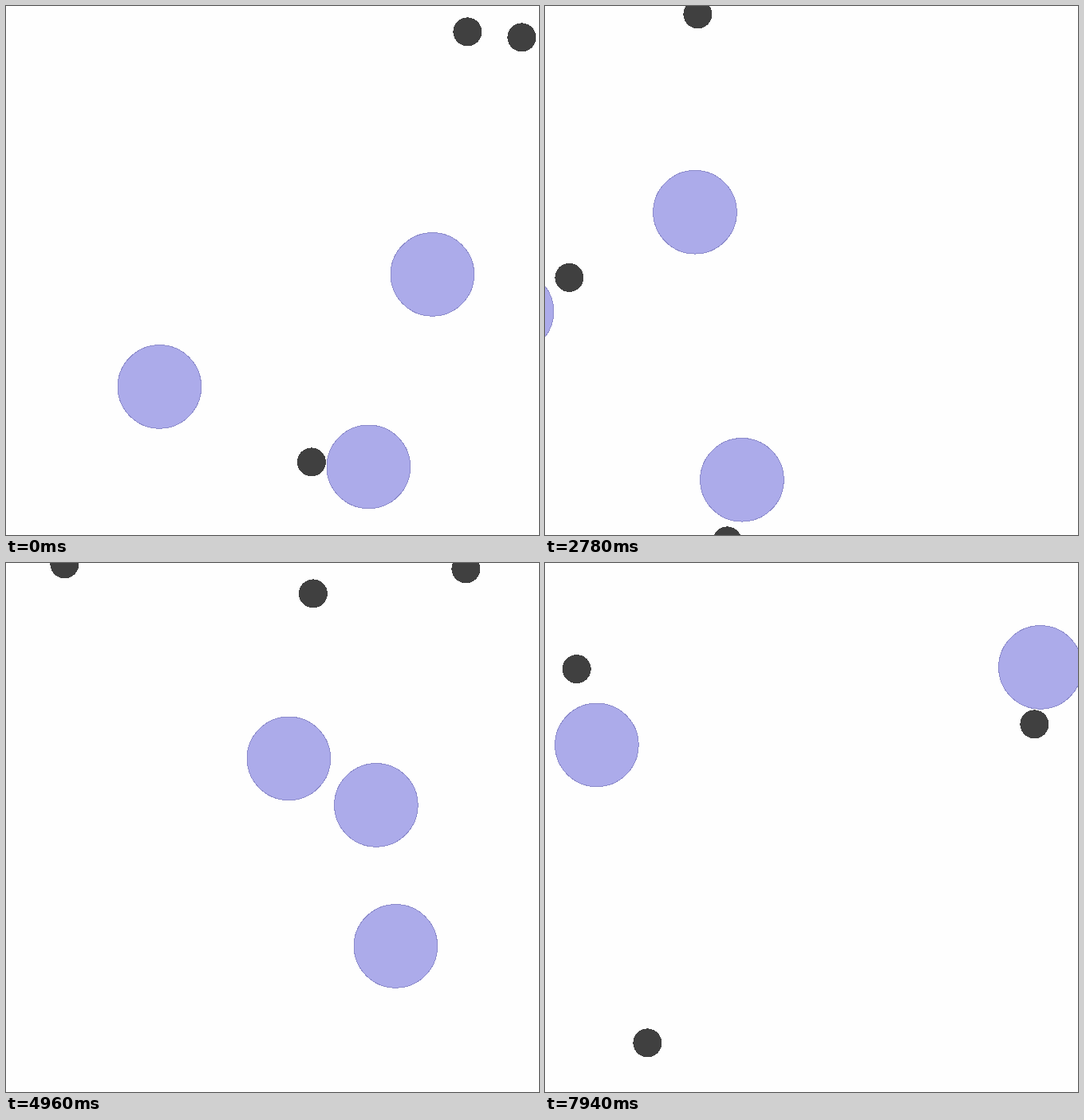
An HTML page that plays this animation: 668 by 664 pixels, repeating every 8000 ms.

```html
<!DOCTYPE html>
<html lang="en">
<head>
<meta charset="utf-8">
<title>Agents and landmarks</title>
<style>
  html, body { margin: 0; width: 100%; height: 100%; overflow: hidden; background: #fefefe; }
  svg { display: block; width: 100%; height: 100%; shape-rendering: crispEdges; }
  .agent { fill: #acabea; stroke: #8c8bcb; stroke-width: 1; }
  .landmark { fill: #404040; }
</style>
</head>
<body>
<svg viewBox="0 0 668 664"><g id="world" transform="translate(.4 .4)"></g></svg>
<script>
const LOOP = 8000, FRAME = 69.65, LEAD = 25, EPISODE = 34;
const at = (x, y) => ({ x, y });

// A smooth path through evenly timed points, at rest at both ends.
function glide(delay, steps, ...points) {
  const last = points.length - 1;
  const slope = (i, axis) =>
    i > 0 && i < last ? (points[i + 1][axis] - points[i - 1][axis]) / 2 : 0;

  return step => {
    const progress = Math.min(Math.max((step - delay) / steps, 0), 1) * last;
    const i = Math.min(Math.floor(progress), last - 1);
    const u = progress - i, v = 1 - u;
    const blend = axis =>
      v * v * (1 + 2 * u) * points[i][axis] + u * u * (3 - 2 * u) * points[i + 1][axis] +
      u * v * (v * slope(i, axis) - u * slope(i + 1, axis));
    return at(blend("x"), blend("y"));
  };
}

const episodes = [
  {
    landmarks: [at(578, 32), at(646, 39), at(382.5, 572)],
    agents: [
      glide(0, 11, at(534, 336.5), at(565, 42)),
      glide(0, 8, at(192, 477.5), at(-70, 440)),
      glide(0, 14, at(454, 578), at(600, 730))
    ]
  },
  {
    landmarks: [at(191, 10), at(30, 340.5), at(228, 671)],
    agents: [
      glide(0, 36, at(345, 290), at(117, 230), at(190, 117.5), at(279, -42), at(215, 70)),
      glide(0, 10, at(300, 480), at(217.5, 656.5)),
      glide(0, 8, at(110, 400), at(-70, 380))
    ]
  },
  {
    landmarks: [at(73, 1), at(384.5, 38), at(576, 7)],
    agents: [
      glide(3, 8, at(354, 245), at(380, 34.5)),
      glide(3, 11, at(463.5, 303.5), at(215, 95), at(112, -60)),
      glide(3, 10, at(488, 480.5), at(160, 605), at(112, 720))
    ]
  },
  {
    landmarks: [at(39.3, 132.7), at(613, 202), at(128, 602)],
    agents: [
      glide(3, 8, at(250.5, 296.5), at(215, 720)),
      glide(3, 9, at(449, 348.5), at(475, 100), at(620.5, 130.5)),
      glide(3, 9, at(70, 422.5), at(64.5, 228))
    ]
  }
];

const world = document.getElementById("world");

function makeCircles(name, radius) {
  return [0, 1, 2].map(() => {
    const circle = document.createElementNS("http://www.w3.org/2000/svg", "circle");
    circle.setAttribute("class", name);
    circle.setAttribute("r", radius);
    return world.appendChild(circle);
  });
}

const agentDots = makeCircles("agent", 52.3);
const landmarkDots = makeCircles("landmark", 18);

function place(circle, { x, y }) {
  circle.setAttribute("cx", x);
  circle.setAttribute("cy", y);
}

function draw(time) {
  const frame = Math.floor((time % LOOP + LEAD) / FRAME);
  const { landmarks, agents } = episodes[Math.floor(frame / EPISODE)];
  landmarks.forEach((point, i) => place(landmarkDots[i], point));
  agents.forEach((path, i) => place(agentDots[i], path(frame % EPISODE)));
}

const start = performance.now();
function tick() {
  draw(performance.now() - start);
  requestAnimationFrame(tick);
}
tick();
</script>
</body>
</html>
```
